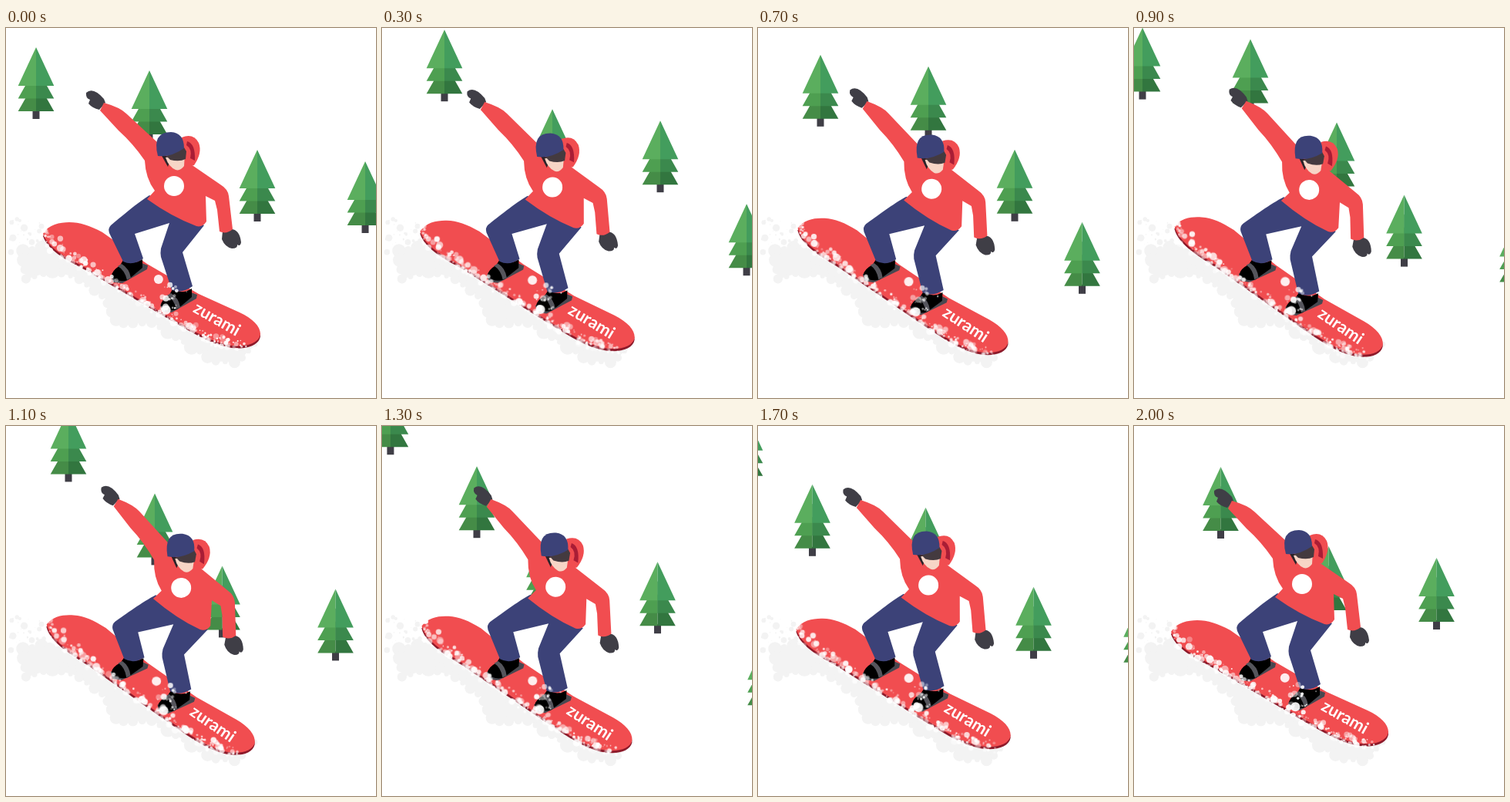
Recreate the animation shown at these times as an HTML page. Size 480 px wide and 480 px high, loop 2100 ms.

```html
<!DOCTYPE html>
<html lang="en">
<head>
<meta charset="utf-8">
<title>Snowboarder</title>
<style>
html, body { margin: 0; width: 100%; height: 100%; overflow: hidden; background: #fff; }
svg { display: block; width: 100vw; height: 100vh; }
.red { fill: #f14d50; }
.blue { fill: #3c4278; }
.dark { fill: #3f3e46; }
.snow { fill: #f3f3f3; }
#spray { fill: #fff; filter: blur(.5px); }
text { font: bold 22px Lato, sans-serif; fill: #fff; text-anchor: middle; }
</style>
</head>
<body>
<svg viewBox="0 0 480 480">
  <defs>
    <g id="tree"><path class="dark" d="M-4.500 80h9v12h-9z"/></g>
    <g id="boot">
      <path fill="#484850" d="M136 321L176 305 184 308 183 313 151 331 139 330z"/>
      <path d="M152 301Q165 308 177 300V311L158 327Q145 331 137 322 137 315 148 308z"/>
      <path fill="#55555c" d="M145 309Q154 314 157 327L162 324Q160 312 150 306z"/>
    </g>
    <path id="deck" d="M48 267C55 255 70 252 82 252 96 252 108 256 125 265L183 306 250 345 303 369C320 377 330 387 330 397 328 411 305 416 283 410 262 405 238 390 215 377L105 312C85 301 55 288 48 267z"/>
  </defs>

  <g id="forest"></g>

  <g id="drift" class="snow">
    <path id="bank" d="M22 289L50 284 105 316 215 380 283 415 325 408 300 434 270 432 225 404 190 382 145 383 128 350 92 324 60 315 26 326z"/>
  </g>

  <g id="rider">
    <use href="#deck" y="3" fill="#8d1a2a"/>
    <use href="#deck" class="red"/>
    <text transform="translate(270 384) rotate(29.500)">zurami</text>
    <use href="#boot"/>
    <use href="#boot" x="64" y="38"/>
    <path class="blue" d="M186 217C170 227 148 246 136 256Q132 260 134 266L152 303Q165 309 178 299L167 267 212 253 201 286Q200 292 201 297L215 340Q228 345 242 335L229 291 257 256z"/>
    <path class="dark" d="M104 84Q113 76 127 92L129 97 121 106Q112 104 107 98L109 93Q103 91 104 84z"/>
    <path class="dark" d="M281 264Q302 254 305 278 304 284 300 281 301 286 293 286 284 284 280 274z"/>
    <path class="red" d="M228 142Q243 136 250 149 255 162 244 178L228 182z"/>
    <path fill="#a91d35" d="M235 147Q246 150 245 172L239 169Q242 157 234 152z"/>
    <path class="red" d="M127 97Q148 103 156 111L196 148 243 179 278 203Q288 209 289 218L294 261Q286 268 277 264L274 236 271 224 259 218 260 251Q255 259 247 257 215 245 183 222L193 211Q181 195 180 172 165 150 146 133L122 107z"/>
    <circle cx="218" cy="205" r="13" fill="#fff"/>
    <path fill="#2b2329" d="M201 164L210 180 214 168z"/>
    <path fill="#f7d5c6" d="M207 168L232 164 231 179Q226 186 220 184 211 180 207 168z"/>
    <path fill="#443a3f" d="M208 166L231 155 234 160 233 170Q225 174 213 171z"/>
    <path class="blue" d="M197 166Q189 135 214 135 231 136 231 156 214 168 197 166z"/>
    <g id="spray"></g>
  </g>
</svg>
<script>
const $ = id => document.getElementById(id);

function add(parent, tag, attrs) {
  const el = document.createElementNS("http://www.w3.org/2000/svg", tag);
  for (const k in attrs) el.setAttribute(k, attrs[k]);
  return parent.appendChild(el);
}

// Repeatable noise in 0..1
const rnd = (i, j) => {
  const v = Math.sin(i * 127.1 + j * 311.7) * 43758.5453;
  return v - Math.floor(v);
};
const along = (path, f) => path.getPointAtLength(f * path.getTotalLength());

// Three tiers, darker towards the ground, right half in shade
for (let i = 2; i >= 0; i--) {
  const top = i ? 7 + 17 * i : -1, base = 49 + 16.5 * i;
  for (const side of [-1, 1])
    add($("tree"), "path", {
      d: `M0 ${top}L${23.3 * side} ${base}H0z`,
      fill: side < 0 ? `hsl(122 34% ${52 - 5.5 * i}%)` : `hsl(${137 - 3 * i} 40% ${44 - 5.5 * i}%)`
    });
}

// One stand of trees, planted twice down the slope
const stand = [[39, 26], [186, 56], [326, 159], [466, 174], [578, 282]];
for (const n of [0, 1])
  for (const [x, y] of stand)
    add($("forest"), "use", { href: "#tree", x: x + n * 626.5, y: y + n * 350 });

// Lumps round the drift, and specks thrown up behind it
for (let i = 0; i < 60; i++) {
  const p = along($("bank"), i / 60);
  add($("drift"), "circle", { cx: p.x, cy: p.y, r: 3 + 7 * rnd(i, 1) });
  add($("drift"), "circle", { cx: 5 + 45 * rnd(i, 2), cy: 248 + 45 * rnd(i, 3), r: 0.4 + 5 * rnd(i, 4) ** 6 });
}

// Spray hugs the lower rim of the board and reaches highest at the tail
const flakes = [];
function flake(x, y, r) {
  flakes.push({ x, y, r, el: add($("spray"), "circle", { r }) });
}
for (let i = 0; i < 230; i++) {
  const f = rnd(i, 5), p = along($("deck"), 1 - 0.46 * f);
  const reach = 14 + 14 * Math.max(0, 1 - 4 * f);
  flake(p.x + 3 * rnd(i, 6), p.y + 6 - reach * rnd(i, 7) ** 1.4, 0.8 + 4.2 * rnd(i, 8) ** 2);
}
for (let i = 0; i < 20; i++)
  flake(200 + 36 * rnd(i, 9), 334 + 30 * rnd(i, 10), 0.8 + 4 * rnd(i, 11) ** 2);
flake(197, 327, 6);
flake(208, 364, 6);

let shown = -1;

function draw(step) {
  $("forest").setAttribute("transform", `translate(${-35 * step} ${-17.6 * step})`);
  const lean = 5.3 * (1 - Math.abs(1 - step / 10));
  $("rider").setAttribute("transform", `rotate(${lean} 164 318)`);
  flakes.forEach(({ x, y, r, el }, i) => {
    el.setAttribute("cx", x + 4 * rnd(i, step + 20) - 2);
    el.setAttribute("cy", y + 4 * rnd(i, step + 50) - 2);
    el.setAttribute("opacity", r > 5 ? 0.9 : 0.3 + 0.65 * rnd(i, step + 80));
  });
}

function tick() {
  const step = Math.floor(performance.now() % 2100 / 100);
  if (step != shown) draw(shown = step);
  requestAnimationFrame(tick);
}
tick();
</script>
</body>
</html>
```
